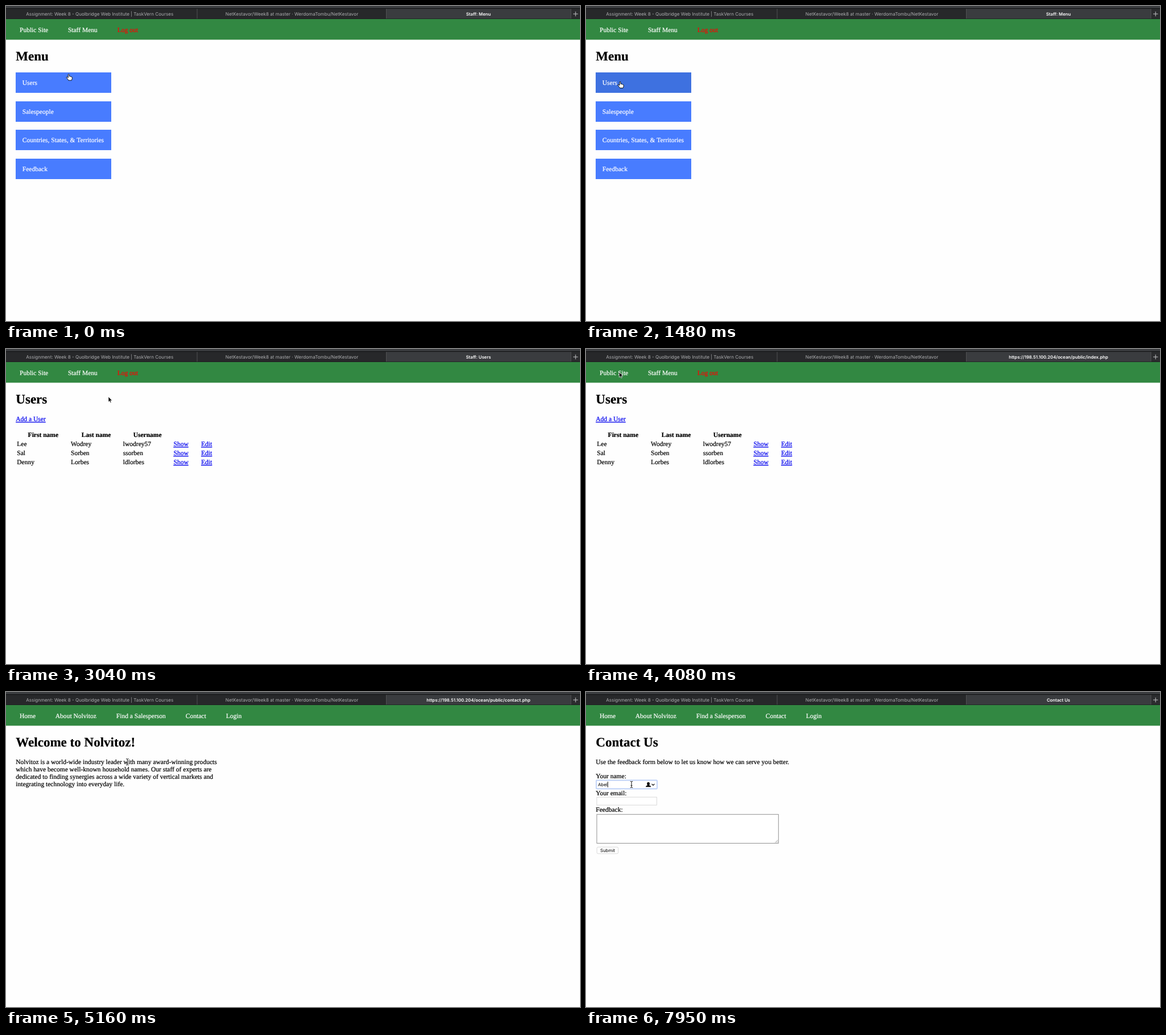
These frames come from a looping animation (1009x555 px, 8000 ms). An HTML page:

```html
<!DOCTYPE html>
<html lang="en">
<head>
<meta charset="utf-8">
<title>Staff site walkthrough</title>
<style>
  html, body { margin: 0; width: 100%; height: 100%; overflow: hidden; background: #fefefe; }
  svg { display: block; width: 100%; height: 100%; }
  text {
    font: 11.52px "Liberation Serif", serif; white-space: pre; text-rendering: geometricPrecision;
    color: #000; fill: currentColor; stroke: currentColor; stroke-width: 0.22;
  }
  .mid { text-anchor: middle; }
  .bold { font-weight: bold; }
  .heading { font-size: 23.04px; font-weight: bold; }
  .nav { color: #fff; }
  .logout { color: #f00; }
  .link { color: #00e; text-decoration: underline; text-decoration-thickness: 0.8px; }
  .ui { font: 7.92px Inter, sans-serif; stroke: none; }
  .tab { font-size: 8.12px; color: #adaeb0; }
  .active { font-size: 7.7px; font-weight: 600; color: #fff; }
</style>
</head>
<body>
<svg id="stage" viewBox="0 0 1009 555"></svg>
<script>
const LOOP = 8000;
const BRAND = "Nolvitoz";
const HOST = "https://198.51.100.204/ocean/public/";
const BLUE = "#487cff", BLUE_HOVER = "#3e71e0";

const text = (x, y, content, cls = "") =>
  `<text x="${x}" y="${y}" class="${cls}">${content.replace(/&/g, "&amp;")}</text>`;
const rect = (x, y, w, h, fill, extra = "") =>
  `<rect x="${x}" y="${y}" width="${w}" height="${h}" fill="${fill}" ${extra}/>`;
const stroke = (d, color, width, extra = "") =>
  `<path d="${d}" fill="none" stroke="${color}" stroke-width="${width}" ${extra}/>`;
const group = (id, content) => `<g id="${id}">${content}</g>`;
const heading = content => text(17.3, 96, content, "heading");

const staffNav = text(24, 45.7, "Public Site", "nav") + text(108.9, 45.7, "Staff Menu", "nav") +
  text(195.8, 45.7, "Log out", "logout");
const publicNav = [[24, "Home"], [86.8, "About " + BRAND], [193.8, "Find a Salesperson"],
  [315.8, "Contact"], [386.8, "Login"]].map(([x, label]) => text(x, 45.7, label, "nav")).join("");

const browserBar =
  rect(0, 0, 1009, 23, "#3a3c3f") + rect(0, 4, 1009, 1, "#0e0f10") +
  rect(0, 5, 668, 18, "#27282a") + rect(993, 5, 16, 18, "#2b2c2e") +
  [335.5, 668, 992.5].map(x => rect(x, 5, 1, 18, "#505153")).join("") +
  rect(0, 22.3, 1009, 0.7, "#1b1c1d") +
  stroke("M997 14H1005.4M1001.2 9.8V18.2", "#c4c5c7", 1) +
  text(164.7, 16.8, "Assignment: Week 8 - Quolbridge Web Institute | TaskVern Courses", "ui tab mid") +
  text(502.5, 16.8, "NetKestavor/Week8 at master · WerdomaTombu/NetKestavor", "ui tab mid") +
  `<text id="title" x="830.5" y="16.8" class="ui active mid"></text>`;

const menuPage = staffNav + heading("Menu") +
  ["Users", "Salespeople", "Countries, States, & Territories", "Feedback"].map((label, i) => {
    const y = Math.round(117 + i * 50.6);
    return rect(17, y, 168, 36, BLUE, i ? "" : 'id="usersButton"') + text(28.8, y + 22, label, "nav");
  }).join("");

const people = [["Lee", "Wodrey", "lwodrey57"], ["Sal", "Sorben", "ssorben"], ["Denny", "Lorbes", "ldlorbes"]];
const usersPage = staffNav + heading("Users") + text(17.3, 127.3, "Add a User", "link") +
  [[65.3, "First name"], [158.6, "Last name"], [248.6, "Username"]]
    .map(([x, label]) => text(x, 155.3, label, "bold mid")).join("") +
  people.map(([first, last, user], i) => {
    const y = 171.3 + i * 15.9;
    return text(19.3, y, first) + text(114, y, last) + text(205.8, y, user) +
      text(294.5, y, "Show", "link") + text(343, y, "Edit", "link");
  }).join("");

const homePage = publicNav + heading(`Welcome to ${BRAND}!`) + [
  BRAND + " is a world-wide industry leader with many award-winning products",
  "which have become well-known household names. Our staff of experts are",
  "dedicated to finding synergies across a wide variety of vertical markets and",
  "integrating technology into everyday life."
].map((line, i) => text(17.3, 127.3 + i * 13, line)).join("");

const field = y => rect(19, y, 105.3, 14, "#fff", 'stroke="#cfcfcf" stroke-width="0.8"');
const focusedField =
  rect(18, 155.5, 107, 15, "#fff", 'rx="1" stroke="#bed1f8" stroke-width="1.8"') +
  `<path d="M105 167.3Q105 164.9 108.3 164.5Q107 163 107.2 161Q107.6 158.8 109.6 158.8Q111.6 158.8
    112 161Q112.2 163 110.9 164.5Q114.2 164.9 114.2 167.3Z"/>` +
  stroke("M115.6 162L118 164.4L120.4 162", "#111", 1.2) +
  `<text id="typed" x="20.9" y="166.1" class="ui"></text>` +
  rect(21, 158, 0.9, 10, "#000", 'id="caret"');
const contactPage = publicNav + heading("Contact Us") +
  text(17.3, 127.3, "Use the feedback form below to let us know how we can serve you better.") +
  text(17.3, 152, "Your name:") + field(156) + group("focus", focusedField) +
  text(17.3, 181.7, "Your email:") + field(185.2) +
  text(17.3, 211.3, "Feedback:") +
  rect(19, 215.7, 319.3, 50.8, "#fff", 'stroke="#858585" stroke-width="0.9"') +
  stroke("M332.6 265.4L337.2 260.8M335.2 265.4L337.2 263.4", "#777", 0.7) +
  rect(19.2, 273.2, 37.4, 11.6, "#fff", 'rx="2" stroke="#d0d0d0" stroke-width="0.8"') +
  text(37.9, 281.9, "Submit", "ui mid");

const beam = "M-2.2-5.6Q0-5.6 0-4.4Q0-5.6 2.2-5.6M0-4.4V4.4M-2.2 5.6Q0 5.6 0 4.4Q0 5.6 2.2 5.6M-1.4 1.8H1.4";
const cursors = {
  arrow: `<path d="M0 0V9.4L2.1 7.5L3.5 10.7L5.1 10L3.7 6.9H6.6Z" stroke="#fff" stroke-width="0.7"/>`,
  hand: `<path d="M-1 1Q0-.6 1 1V4.4Q2.4 3.7 3 4.9Q4.2 4.3 4.8 5.5Q6.3 5.3 6.2 7.4Q6 9.6 5 11.5H-.4
    Q-1.2 9.6-3.8 7Q-4.5 5.2-2.8 5.6L-1 7Z" fill="#fff" stroke="#000" stroke-width="0.9"/>`,
  beam: stroke(beam, "#fff", 1.8) + stroke(beam, "#111", 1)
};

const pages = { menu: menuPage, users: usersPage, home: homePage, contact: contactPage };
const stage = document.getElementById("stage");
stage.innerHTML = rect(0, 0, 1009, 555, "#fefefe") + browserBar + rect(0, 23, 1009, 36.4, "#328842") +
  Object.entries(pages).map(([id, content]) => group(id, content)).join("") +
  group("pointer", Object.entries(cursors).map(([id, content]) => group(id, content)).join(""));
const el = id => document.getElementById(id);

// Each entry changes part of the state at its time.
const at = (x, y, cursor, more) => ({ x, y, cursor, ...more });
const timeline = [
  [0, at(110.2, 119.5, "hand", { page: "menu", title: "Staff: Menu", hover: false, focus: false, typed: "", caret: true })],
  [170, at(111, 149, "hand", { hover: true })],
  [440, at(112, 154, "arrow", { hover: false })],
  [590, at(110, 130, "hand", { hover: true })],
  [740, at(109, 98, "arrow", { hover: false })],
  [890, at(109, 72, "arrow")],
  [1030, at(104, 84, "arrow")],
  [1180, at(90, 104, "arrow")],
  [1330, at(70, 125, "hand", { hover: true })],
  [1480, at(60, 133, "hand")],
  [1810, { title: HOST + "staff/users/index.php" }],
  [1980, at(92, 125, "arrow")],
  [2150, at(165, 107, "arrow")],
  [2320, at(210, 95.5, "arrow")],
  [2680, { page: "users", title: "Staff: Users" }],
  [2865, at(180, 84, "arrow")],
  [3050, at(118, 62, "arrow")],
  [3235, at(70, 45, "hand")],
  [3420, at(59, 41, "hand")],
  [3900, { title: HOST + "index.php" }],
  [4080, at(58.3, 40.5, "arrow")],
  [4290, at(110, 44, "arrow", { page: "home", title: "Welcome to " + BRAND })],
  [4490, at(240, 45, "hand")],
  [4680, at(331, 41, "hand")],
  [4950, { title: HOST + "contact.php" }],
  [5160, at(213.3, 123.2, "beam")],
  [5370, at(140, 150, "arrow", { page: "contact", title: "Contact Us" })],
  [5580, at(92, 161, "beam")],
  [5790, at(80, 163, "beam")],
  [6180, { focus: true }],
  [6480, { caret: false }],
  [6780, { typed: "A", caret: true }],
  [6960, { typed: "Ab" }],
  [7410, { caret: false }],
  [7590, { typed: "Abe", caret: true }],
  [7950, { typed: "Abel" }]
];

const show = (id, visible) => el(id).setAttribute("display", visible ? "inline" : "none");

function draw(t) {
  const state = Object.assign({}, ...timeline.filter(([time]) => time <= t).map(([, change]) => change));
  for (const id in pages) show(id, id === state.page);
  for (const id in cursors) show(id, id === state.cursor);
  el("title").textContent = state.title;
  el("usersButton").setAttribute("fill", state.hover ? BLUE_HOVER : BLUE);
  show("focus", state.focus);
  el("typed").textContent = state.typed;
  const typedWidth = state.typed ? el("typed").getComputedTextLength() : 0;
  el("caret").setAttribute("x", 21 + typedWidth);
  show("caret", state.caret);
  el("pointer").setAttribute("transform", `translate(${state.x} ${state.y})`);
}

const start = performance.now();
function tick() {
  draw((performance.now() - start) % LOOP);
  requestAnimationFrame(tick);
}
tick();
</script>
</body>
</html>
```
